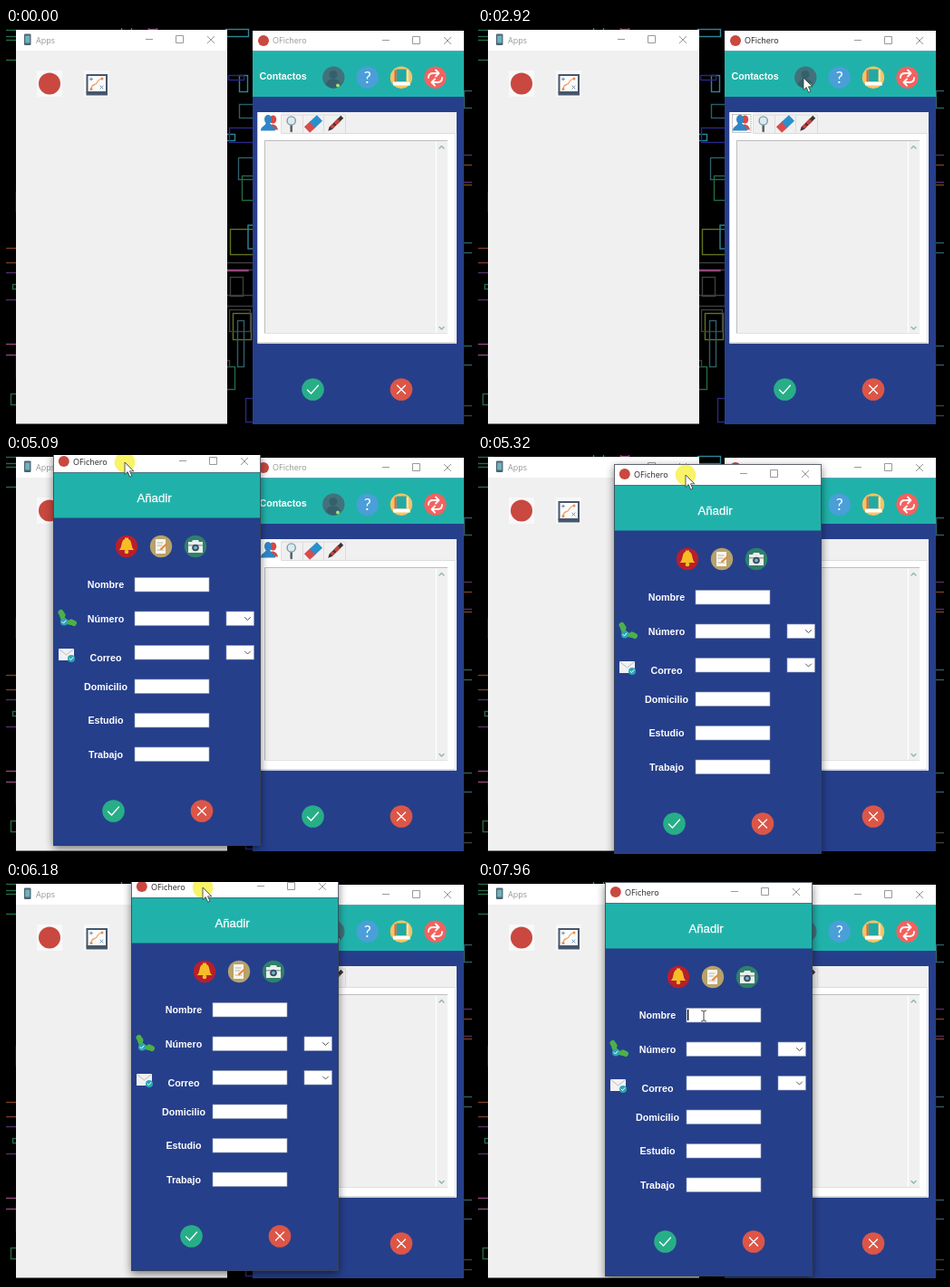
Recreate the animation shown at these times as an HTML page. Size 514x441 px, loop 8 s.

```html
<!DOCTYPE html>
<html lang="es">
<head>
<meta charset="utf-8">
<title>Contactos</title>
<style>
  html, body { margin: 0; width: 100%; height: 100%; overflow: hidden; background: #000; }
  svg { display: block; width: 100%; height: 100%; }
  .title { font: 9px "Open Sans", sans-serif; fill: #969696; }
  .dark, .active .title { fill: #222; }
  .bold { font: bold 10.7px "Liberation Sans", sans-serif; fill: #fff; }
  .mid { text-anchor: middle; }
  .line { fill: none; stroke-linecap: round; stroke-linejoin: round; }
  .ctl { fill: none; stroke: #999; }
  .faded .ctl { stroke: #a096b8; }
  .active .ctl, #dialog .ctl { stroke: #333; }
</style>
</head>
<body>
<svg viewBox="0 0 514 441" preserveAspectRatio="none">
  <defs>
    <filter id="soft" x="-20%" y="-20%" width="140%" height="140%"><feGaussianBlur stdDeviation="5"/></filter>
    <path id="controls" class="ctl" d="M-90 10.5h8M-56.5 6.500h8v8h-8zM-22 7l8 8M-14 7l-8 8"/>
    <g id="ok">
      <circle r="12.300" fill="#27ae87"/>
      <path class="line" stroke="#fff" stroke-width="1.300" d="M-6 .5l4 4 8-9"/>
    </g>
    <g id="no">
      <circle r="12.300" fill="#dc5647"/>
      <path class="line" stroke="#fff" stroke-width="1.300" d="M-4.500-4.500l9 9M4.500-4.500l-9 9"/>
    </g>
    <path id="chevron" class="line" stroke="#555" d="M-3-1.500l3 3 3-3"/>
    <g id="tick">
      <circle r="4" fill="#2ba5b5"/>
      <path class="line" stroke="#fff" d="M-2 0l1.500 1.500 2.500-3"/>
    </g>
  </defs>

  <rect width="514" height="441"/>
  <g id="wall" fill="none" stroke-width="1.400" opacity=".75"></g>

  <g id="apps">
    <rect x="11" y="2" width="233" height="435.500" fill="#f0f0f0"/>
    <rect x="11" y="2" width="233" height="23" fill="#fff"/>
    <rect x="20" y="6.500" width="7.500" height="12.500" rx="1" fill="#4b6470"/>
    <rect x="21.200" y="8.500" width="5" height="8" fill="#6fb2bd"/>
    <text class="title" x="33" y="16.700">Apps</text>
    <use href="#controls" x="244" y="2"/>
    <rect x="34" y="47" width="28" height="29" fill="#f8f8f8"/>
    <circle cx="48" cy="61.500" r="12" fill="#c9483f"/>
    <rect x="86" y="47" width="28" height="29" fill="#f8f8f8"/>
    <rect x="89.500" y="52" width="21.500" height="19" fill="#fbfbfb" stroke="#46566b" stroke-width="2"/>
    <path d="M88.500 70.500h23.500v4h-23.500z" fill="#46566b"/>
    <path class="line" stroke="#ee9c62" stroke-width="1.200" d="M94 67c1-6 4-3 6-6s1-4 6-5"/>
    <path class="line" stroke="#6d8fb0" d="M92.500 56.500h3M94 55v3M104 64l3 3M107 64l-3 3"/>
    <circle cx="94" cy="67.500" r="1.500" fill="#ee8a4c"/>
    <circle cx="106" cy="56" r="1.500" fill="#ee8a4c"/>
  </g>

  <g id="main">
    <rect x="272" y="3" width="233" height="435" fill="#263f8b"/>
    <rect x="272" y="3" width="233" height="22.500" fill="#fff"/>
    <rect x="272" y="25.500" width="233" height="50.500" fill="#20b2aa"/>
    <circle cx="284" cy="14" r="6" fill="#c9483f"/>
    <text class="title" x="294" y="17.400">OFichero</text>
    <use href="#controls" x="505" y="3"/>
    <text class="bold" x="279.500" y="56.500">Contactos</text>

    <g id="add">
      <circle cx="361.300" cy="54.700" r="12.200" fill="#42717c"/>
      <circle cx="361" cy="51.500" r="4.500" fill="#35606b"/>
      <path d="M353 63c0-9 16-9 16 0q-8 7-16 0z" fill="#35606b"/>
      <circle cx="366" cy="63.500" r="2" fill="#a8e070"/>
    </g>
    <circle cx="398.700" cy="54.700" r="12.200" fill="#4a9fd9"/>
    <text class="mid" x="398.700" y="61" font-family="Lato, sans-serif" font-size="18" fill="#fff">?</text>
    <circle cx="436" cy="54.700" r="12.200" fill="#f8c463"/>
    <path d="M430.500 45.500h11v14h-11z" fill="#21aaa4"/>
    <path d="M428.500 46.500h2v14h-2z" fill="#d66049"/>
    <path d="M427 59.500h18l1 4h-19z" fill="#fff"/>
    <path class="line" stroke="#e8f5f4" stroke-width="1.300" d="M443 47v11"/>
    <circle cx="473.500" cy="54.700" r="12.200" fill="#f2625f"/>
    <path class="line" stroke="#fff" stroke-width="1.800" d="M466 55q0-5 5-5h6m-3-3.500l3.500 3.500-3.500 3.500M481 55q0 5-5 5h-6m3-3.500l-3.500 3.500 3.500 3.500"/>

    <rect x="277.500" y="93" width="219.500" height="255.500" fill="#f0f0f0"/>
    <path d="M277.500 93h26v23.500h193.500V348.500h-219.500z" fill="#fff"/>
    <path d="M303.500 116.500h192v231h-218" fill="none" stroke="#dcdcdc"/>
    <path d="M303.500 116v-20h71v20M327.500 96v20M350.500 96v20" fill="none" stroke="#dcdcdc"/>
    <g id="people">
      <ellipse cx="294.500" cy="101" rx="3.800" ry="4.500" fill="#d34b45"/>
      <path d="M289 112.500c1-9 10-7 11 0z" fill="#d34b45"/>
      <ellipse cx="289" cy="101" rx="4" ry="5" fill="#2f86c6"/>
      <path d="M281 113.500c0-5 5-5 6-9h4c1 4 6 4 6 9z" fill="#2f86c6"/>
    </g>
    <path class="line" stroke="#54606b" stroke-width="2.500" d="M314.700 108v6"/>
    <circle cx="314.700" cy="102.500" r="4.600" fill="#d4edf5" stroke="#8c969d" stroke-width="1.400"/>
    <g transform="translate(339 106) rotate(-43)">
      <path d="M-9.500-4.500h9v9h-9z" fill="#d84c4c"/>
      <path d="M-1.500-4.500h11v9h-11z" fill="#2990cd"/>
    </g>
    <g transform="translate(363 106) rotate(-45)">
      <path d="M-11 0l4-2h18v4h-18z" fill="#3a3434"/>
      <path d="M-6-2h4v4h-4zM0-2h6v4h-6z" fill="#c8403c"/>
    </g>
    <rect id="focus" x="280.500" y="95.500" width="20.500" height="20" fill="none" stroke="#888" stroke-dasharray="1 1"/>

    <rect x="285" y="124" width="202" height="213.500" fill="#f0f0f0"/>
    <path d="M285.500 337.500v-213h201.500" fill="none" stroke="#bdbdbd"/>
    <path d="M474.500 125.500v212" stroke="#fff" stroke-width="1.300"/>
    <path d="M285 337.500h202" stroke="#e2e2e2"/>
    <path class="line" stroke="#8fb5ad" stroke-width="1.400" d="M478 133l2.500-2.500 2.500 2.500M478 330.500l2.500 2.500 2.500-2.500"/>
    <use href="#ok" x="338.500" y="399.500"/>
    <use href="#no" x="436" y="399.500"/>
  </g>

  <g id="dialog">
    <rect y="3" width="229" height="436" opacity=".5" filter="url(#soft)"/>
    <rect width="229" height="436" fill="#263f8b"/>
    <rect width="229" height="23.500" fill="#fff"/>
    <rect y="23.500" width="229" height="50" fill="#20b2aa"/>
    <path d="M0 23.500h229" stroke="#345" stroke-opacity=".5"/>
    <rect x=".5" y=".5" width="228" height="435" fill="none" stroke="#39404f" stroke-opacity=".8"/>
    <circle cx="11.800" cy="11" r="6" fill="#c9483f"/>
    <text class="title dark" x="22" y="14.700">OFichero</text>
    <use href="#controls" x="229"/>
    <text class="mid" x="111.500" y="56" font-family="Liberation Sans, sans-serif" font-size="13.200" fill="#fff" stroke="#fff" stroke-width=".3">Añadir</text>

    <circle cx="81" cy="105" r="12.200" fill="#b81f2c"/>
    <path d="M72.500 109c4-2 2-11 6.500-12v-1.500h4V97c4.500 1 2.500 10 6.500 12z" fill="#f6bd26"/>
    <circle cx="81" cy="111" r="2.300" fill="#f6bd26"/>
    <circle cx="119" cy="105" r="12.200" fill="#b7a26a"/>
    <path d="M113 97h11v16h-11z" fill="#f8f5ec"/>
    <path class="line" stroke="#b5b5b5" d="M115 101h6M115 104h5M115 109h7"/>
    <path class="line" stroke="#e68939" stroke-width="2.200" d="M119 108l5.500-5"/>
    <circle cx="157" cy="105" r="12.200" fill="#2f8168"/>
    <path d="M149 100h4l1-2h6l1 2h4v12h-16z" fill="#e9eef0"/>
    <path d="M149 103h16v1.500h-16z" fill="#9aa5a8"/>
    <circle cx="157" cy="106.500" r="3.800" fill="#3c4a55"/>
    <circle cx="157" cy="106.500" r="1.900" fill="#6fb5cf"/>

    <g id="form"></g>
    <path class="line" stroke="#4db04a" stroke-width="4.500" d="M9 178q0 11 13 12"/>
    <path class="line" stroke="#4db04a" stroke-width="6" d="M8.500 178l2 3M20 188.500l3 1.500"/>
    <use href="#tick" x="12" y="188.500"/>
    <rect x="6" y="218" width="17" height="13" fill="#f1f1f1"/>
    <path class="line" stroke="#bcbcbc" d="M6.500 218.500l8 6.500 8-6.500"/>
    <use href="#tick" x="20" y="229"/>
    <rect id="caret" x="91" y="141" width="1.300" height="12"/>
    <use href="#ok" x="66.500" y="397.500"/>
    <use href="#no" x="164" y="397.500"/>
  </g>

  <g id="pointer">
    <circle id="press" r="11.300" fill="#f7ef35" opacity=".75"/>
    <path id="arrow" d="M0 0v13.500l3.200-2.900 2.400 5.600 2.300-1-2.400-5.400h4.300z" fill="#fff" stroke="#333" stroke-width=".8"/>
    <path id="beam" class="line" stroke="#444" d="M-2.500-6q2.500 0 2.500 1.500v9q0 1.500-2.500 1.500M2.500-6Q0-6 0-4.500M2.500 6Q0 6 0 4.500"/>
  </g>
</svg>

<script>
const LOOP = 8000, STEP = 77;
const $ = id => document.getElementById(id);

function put(parent, tag, attrs, text) {
  const el = document.createElementNS("http://www.w3.org/2000/svg", tag);
  for (const k in attrs) el.setAttribute(k, attrs[k]);
  if (text) el.textContent = text;
  parent.append(el);
}

// Wallpaper: seeded outlines over the whole stage; the windows hide most of it.
const hues = ["#3a36b4", "#6e3f90", "#2f8f5c", "#3bb6c8", "#c45fa5", "#3d7f8d", "#a5542f", "#7f9a2e", "#555"];
const outline = (x, y, width, height, hue) =>
  put($("wall"), "rect", { x, y, width, height, stroke: hues[hue] });

let seed = 29;
const rand = n => {
  seed = (seed * 16807) % 2147483647;
  return Math.floor(seed / 2147483647 * n);
};
for (let i = 0; i < 150; i++) {
  outline(rand(520) - 12.5, rand(440) - 8.5, 8 + rand(32), 5 + rand(26), rand(hues.length));
}
outline(246.5, 110.5, 40, 16, 0);
outline(267, 218, 20, 26, 3);
outline(240, 267.5, 27, 1, 4);
outline(255.500, 323.500, 7, 51, 5);

["Nombre", "Número", "Correo", "Domicilio", "Estudio", "Trabajo"].forEach((label, i) => {
  const y = 139.5 + 37.5 * i, form = $("form"), combo = i === 1 || i === 2;
  const field = (x, width) =>
    put(form, "rect", { x, y, width, height: 15.5, fill: "#fff", stroke: "#8f9bb8", "stroke-width": .6 });
  put(form, "text", { class: "bold mid", x: 58, y: y + 11.7 + (label === "Correo" ? 6 : 0) }, label);
  field(90, 82);
  if (combo) {
    field(191, 30.5);
    put(form, "use", { href: "#chevron", x: 214.5, y: y + 8 });
  }
});

const linear = p => p;
const easeOut = p => 1 - (1 - p) ** 2;
const mix = (a, b, p) => a + (b - a) * p;

// One stroke of the hand; lift bows the path upwards.
const go = (start, end, from, to, ease = linear, lift = 0) => ({ start, end, from, to, ease, lift });

const pointerMoves = [
  go(190, 1050, [373, 416], [137, 345], linear, 115),
  go(1050, 1820, [138, 373], [345, 50]),
  go(1910, 2370, [346, 50], [359, 55]),
  go(3380, 3530, [320, 68], [-60, 170]),
  go(7100, 7340, [219, 14], [225, 165]),
  go(7570, 7800, [228, 164], [249, 148])
];
const dialogMoves = [
  go(4940, 5325, [-122, -29], [150, 10], easeOut),
  go(5325, 5556, [150, 10], [141, 10]),
  go(5556, 5860, [141, 10], [132, 1]),
  go(6090, 6170, [133, -4], [138, -6]),
  go(6170, 6330, [138, -6], [140, 0])
];

// The screen refreshes every STEP ms, so each move advances in whole steps.
function place(moves, t) {
  const m = moves.filter(m => m.start <= t).pop() || moves[0];
  const n = Math.round((m.end - m.start) / STEP);
  const k = Math.floor((t - m.start + 10) / (m.end - m.start) * n);
  const p = Math.min(1, Math.max(0, k / n)), e = m.ease(p);
  return [mix(m.from[0], m.to[0], e), mix(m.from[1], m.to[1], e) - m.lift * Math.sin(Math.PI * p)];
}

const within = (t, a, b) => t >= a && t < b;
const show = (id, on) => $(id).setAttribute("visibility", on ? "inherit" : "hidden");
const move = (id, [x, y]) => $(id).setAttribute("transform", `translate(${Math.round(x)} ${Math.round(y)})`);

function draw(t) {
  const box = place(dialogMoves, t);
  const drag = within(t, 4940, 7100);
  const typing = t >= 7720;

  show("dialog", t >= 4940);
  move("dialog", box);
  show("caret", t >= 7800);

  show("pointer", t >= 190 && !within(t, 3530, 4940));
  move("pointer", drag ? [box[0] + 79, box[1] + 12] : place(pointerMoves, t));
  show("press", drag || within(t, 2600, 2750) || within(t, 7800, 7960));
  show("arrow", !typing);
  show("beam", typing);

  move("add", within(t, 2600, 2920) ? [1, 1] : [0, 0]);
  show("focus", within(t, 2600, 4620));
  $("main").setAttribute("class", within(t, 2600, 4540) ? "active" : t >= 4540 ? "faded" : "");
}

const began = performance.now();
function tick() {
  draw((performance.now() - began) % LOOP);
  requestAnimationFrame(tick);
}
tick();
</script>
</body>
</html>
```
